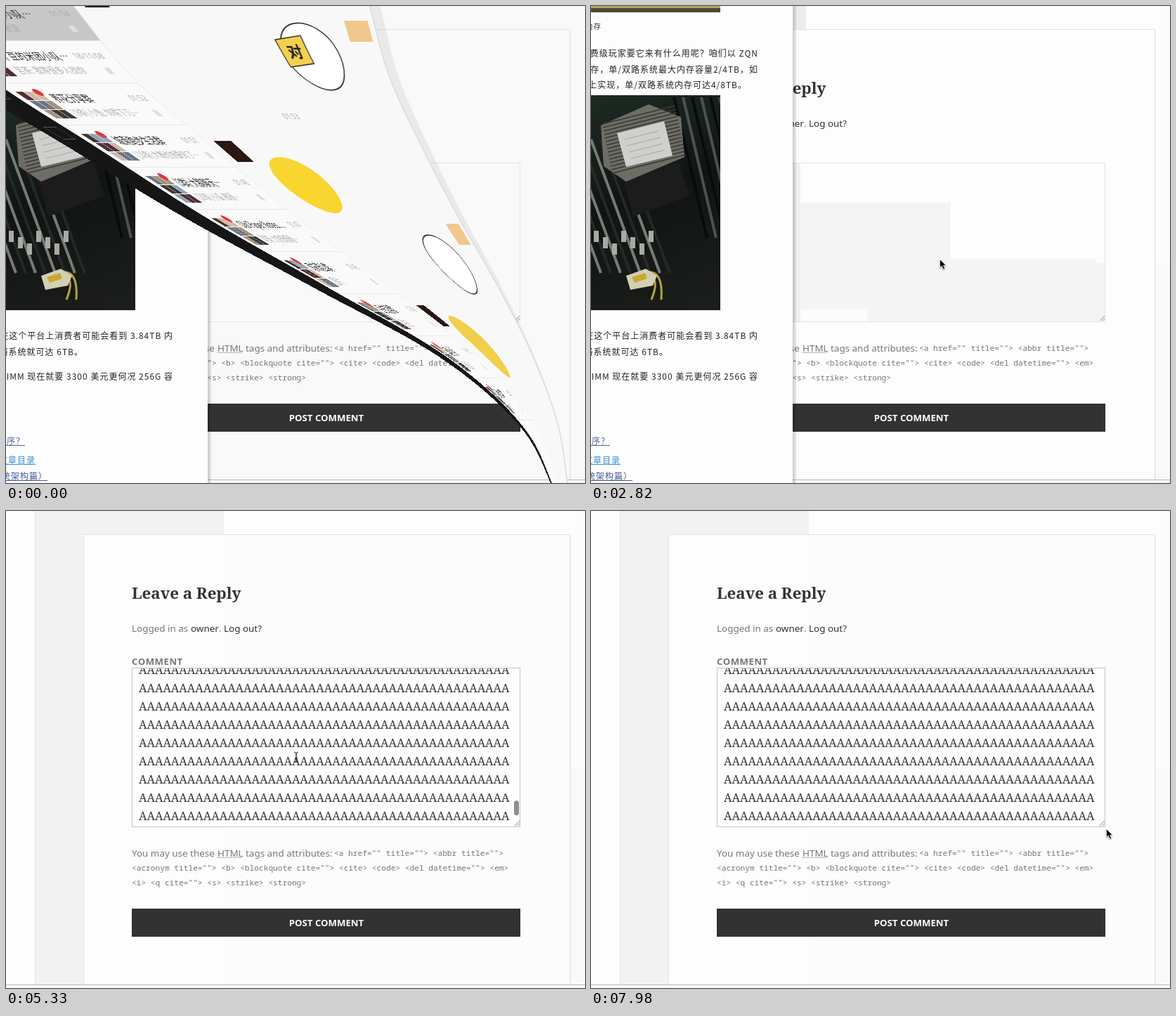
These frames come from a looping animation (824 px wide and 679 px high, 8 s). An HTML page with a canvas:

```html
<!DOCTYPE html>
<html lang="en">
<head>
<meta charset="utf-8">
<style>
html, body { margin: 0; width: 824px; height: 679px; overflow: hidden; background: #fdfdfd; }
canvas { display: block; }
</style>
</head>
<body>
<canvas id="stage" width="824" height="679"></canvas>
<script>
const LOOP = 8000;
const SANS = '"Noto Sans", sans-serif';
const SERIF = '"Noto Serif", serif';
const MONO = '"Noto Sans Mono", monospace';
const CJK = '"Noto Sans CJK SC", "Noto Sans CJK", sans-serif';
const GREY = '#777', DARK = '#333';

const stage = document.getElementById('stage').getContext('2d');
let c = stage;

function rect(x, y, w, h, fill) {
  c.fillStyle = fill;
  c.fillRect(x, y, w, h);
}

function text(str, x, y, font, fill, align = 'left', spacing = 0) {
  c.font = font;
  c.fillStyle = fill;
  c.textAlign = align;
  c.letterSpacing = spacing + 'px';
  c.fillText(str, x, y);
}

function path(points, fill, stroke, width = 1) {
  c.beginPath();
  for (let i = 0; i < points.length; i += 2) c.lineTo(points[i], points[i + 1]);
  if (fill) { c.closePath(); c.fillStyle = fill; c.fill(); }
  if (stroke) { c.strokeStyle = stroke; c.lineWidth = width; c.stroke(); }
}

function ellipse(x, y, rx, ry, angle, fill, stroke) {
  c.beginPath();
  c.ellipse(x, y, rx, ry, angle, 0, 7);
  c.fillStyle = fill;
  c.fill();
  if (stroke) { c.strokeStyle = stroke; c.lineWidth = 1.5; c.stroke(); }
}

function frame(x, y, w, h, stroke) {
  c.strokeStyle = stroke;
  c.lineWidth = 1;
  c.strokeRect(x + .5, y + .5, w - 1, h - 1);
}

// Latest entry whose time has passed
const at = (keys, t) => keys.findLast(k => k[0] <= t);

const pointer = [
  [0, -50, -50], [1180, 274, 280], [1330, 577, 500], [1630, 688, 626],
  [1780, 702, 648], [1930, 711, 664], [2070, 713, 672], [2220, 707, 668],
  [2670, 600, 505], [2820, 496, 360], [3830, 500, 367], [4580, 400, 277],
  [4880, 402, 290], [5030, 406, 312], [5180, 410, 335], [5330, 413, 350],
  [5770, 440, 376], [5910, 560, 405], [6060, 660, 428], [6210, 716, 434],
  [6350, 739, 432], [6500, 746, 475], [6640, 755, 555], [6790, 763, 632],
  [6940, 780, 664], [7240, 739, 641], [7680, 738, 570], [7830, 735, 500],
  [7980, 733, 452]
];
const scrolling = [[0, 0], [5030, 7], [5180, 20], [5330, 33], [5770, 59], [5910, 85]];

function drawBackground(t) {
  if (t < 880) return rect(0, 0, 824, 679, '#f9f9f9');
  rect(0, 0, 824, 679, '#fdfdfd');
  rect(804, 366, 20, 308, '#f9f9f9');
  rect(811, 0, 13, 366, '#fbfbfb');
  if (t < 3390) return rect(288, 0, 18, 33, '#ececec');
  rect(310, 34, 492, 640, '#fcfcfc');
  rect(41, 0, 69, 674, '#f2f2f2');
  rect(110, 0, 200, 33, '#f2f2f2');
  rect(41, 0, 1, 674, '#e4e4e4');
}

function drawField(t) {
  if (t >= 3530) rect(180, 224, 551, 225, '#fefefe');
  else if (t >= 880) {
    const open = t >= 3390;
    const left = open ? 310 : 298;
    rect(left, 280, 512 - left, 169, '#f4f4f4');
    rect(512, t >= 2820 ? 360 : 366, 206, 89, '#f4f4f4');
    rect(718, 366, 13, 83, '#f4f4f4');
    rect(left, 431, 393 - left, 18, '#fcfcfc');
    rect(180, 224, left - 180, 225, open ? '#f3f3f3' : '#efefef');
  }
  if (t >= 3530) drawComment(t);
  frame(179, 223, 553, 227, t >= 3530 ? '#c4c4c4' : '#e4e4e4');
  path([724, 448, 731, 441], null, '#888');
  path([728, 448, 731, 445], null, '#888');
}

function drawComment(t) {
  const scroll = at(scrolling, t)[1];
  c.save();
  c.beginPath();
  c.rect(180, 224, 551, 225);
  c.clip();
  let caret = 189, base = 249;
  if (t >= 4580) {
    const font = `16.27px ${SERIF}`;
    base = 433 + scroll;
    const last = 'A'.repeat(28) + "'></a>";
    text(last, 189, base, font, DARK);
    caret = 189 + c.measureText(last).width;
    for (let row = 1; row < 14; row++) text('A'.repeat(46), 189, base - row * 26, font, DARK);
    if (t < 6940) {
      c.beginPath();
      c.roundRect(723, 415 - scroll * .083, 7, 21, 3.5);
      c.fillStyle = '#8e8e8e';
      c.fill();
    }
  }
  if (t >= 3830) rect(Math.round(caret), base - 15, 1, 20, '#222');
  c.restore();
}

function drawPage(t) {
  drawBackground(t);
  frame(110, 33, 693, 660, '#e2e2e2');
  rect(803, 35, 1, 640, '#f0f0f0');
  rect(0, 675, 824, 4, '#fbfbfb');
  rect(0, 674, 824, 1, '#b8b8b8');

  const body = `13.44px ${SANS}`, code = `11.18px ${MONO}`;
  text('Leave a Reply', 179, 125, `bold 22.3px ${SERIF}`, DARK);
  text('Logged in as', 179, 172, body, GREY);
  text('owner', 263, 172, body, DARK);
  text('.', 303, 172, body, GREY);
  text('Log out?', 310, 172, body, DARK);
  text('COMMENT', 179, 219, `bold 13.2px ${SANS}`, GREY, 'left', .5);
  drawField(t);

  text('You may use these', 179, 492, body, GREY);
  text('HTML', 301, 492, body, GREY);
  c.setLineDash([1, 1]);
  path([301, 493.5, 337, 493.5], null, GREY);
  c.setLineDash([]);
  text('tags and attributes:', 341, 492, body, GREY);
  text('<a href="" title=""> <abbr title="">', 467, 491, code, GREY);
  text('<acronym title=""> <b> <blockquote cite=""> <cite> <code> <del datetime=""> <em>', 179, 512, code, GREY);
  text('<i> <q cite=""> <s> <strike> <strong>', 179, 533, code, GREY);
  rect(179, 566, 553, 40, '#323232');
  text('POST COMMENT', 456, 591, `bold 13.2px ${SANS}`, '#fff', 'center');
}

function drawPhoto() {
  c.save();
  c.beginPath();
  c.rect(0, 127, 184, 306);
  c.clip();
  const board = c.createLinearGradient(0, 127, 120, 433);
  board.addColorStop(0, '#1d2b24');
  board.addColorStop(.5, '#101412');
  board.addColorStop(1, '#1b1d1b');
  rect(0, 127, 184, 306, board);
  for (let i = 0; i < 9; i++) {
    path([-70 + i * 14, 190, i * 14, 380], null, i % 2 ? '#777b76' : '#252a27', 4);
    path([118 + i * 13, 130, 165 + i * 13, 330], null, i % 2 ? '#4d524e' : '#090b0a', 4);
  }
  path([45, 245, 125, 222, 140, 270, 60, 300], '#1b1c1b');
  path([14, 170, 82, 140, 128, 158, 133, 215, 50, 250, 18, 228], '#6d6c65');
  for (let i = 0; i < 15; i++) path([16 + i, 168 + i * 5, 120 + i, 142 + i * 5], null, '#383832', 1.5);
  path([37, 181, 104, 164, 116, 213, 50, 229], '#cfcfcd');
  for (let i = 0; i < 4; i++) path([48 + i * 3, 190 + i * 9, 96 + i * 3, 178 + i * 9], null, '#a5a5a2', 1);
  for (let i = 0; i < 7; i++) rect(4 + i * 13, 320 + i % 3 * 9, 7, 16, '#a9aaa4');
  for (let i = 0; i < 4; i++) {
    c.beginPath();
    c.moveTo(62, 386 + i * 4);
    c.quadraticCurveTo(104, 362 + i * 5, 100 - i * 7, 418);
    c.strokeStyle = i % 2 ? '#171712' : '#b3a43f';
    c.lineWidth = 3;
    c.stroke();
  }
  path([50, 384, 78, 374, 94, 384, 88, 398, 56, 404], '#d2cfb4');
  path([58, 386, 77, 380, 80, 388, 62, 394], '#c9a92d');
  c.restore();
}

function drawArticle() {
  const shade = c.createLinearGradient(287, 0, 293, 0);
  shade.addColorStop(0, 'rgba(0,0,0,.2)');
  shade.addColorStop(1, 'rgba(0,0,0,.05)');
  rect(287, 0, 5, 679, shade);
  rect(0, 0, 287, 679, '#fdfdfd');
  rect(0, 0, 184, 9, '#4b4a38');
  rect(0, 0, 184, 3, '#b5a55c');
  drawPhoto();
  const line = (str, right, y, color = '#222', size = 12) =>
    text(str, right, y + 4.5, `${size}px ${CJK}`, color, 'right', 1);
  const link = (str, right, y, color) => {
    line(str, right, y, color);
    rect(0, y + 6, right, 1, color);
  };
  line('内存', 15, 28, '#333', 10.5);
  line('费级玩家要它来有什么用呢？咱们以 ZQN', 238, 67);
  line('内存，单/双路系统最大内存容量2/4TB，如', 238, 90);
  line('台上实现，单/双路系统内存可达4/8TB。', 222, 112);
  line('在这个平台上消费者可能会看到 3.84TB 内', 238, 469);
  line('络系统就可达 6TB。', 110, 492);
  line('DIMM 现在就要 3300 美元更何况 256G 容', 238, 527);
  link('排序？', 27, 619, '#52659b');
  link('文章目录', 42, 646, '#3b8fd4');
  link('统架构篇）', 59, 669, '#445a96');
}

// The chat window, drawn flat once and warped later
function makeChat() {
  const canvas = document.createElement('canvas');
  canvas.width = 700;
  canvas.height = 780;
  c = canvas.getContext('2d');
  rect(0, 0, 700, 780, '#f8f8f8');
  rect(55, 0, 232, 780, '#fafafa');
  rect(0, 0, 55, 780, '#161616');
  rect(55, 80, 232, 60, '#c8c8c8');
  rect(286, 0, 1, 780, '#e3e3e3');
  frame(16, 205, 24, 18, '#555');
  frame(16, 262, 24, 18, '#555');

  const chats = [
    ['小林的汤圆小队…', '01:54', '今天谁来做饭'],
    ['丫豆的米团小队…', '18/11/08', '苦茶: 我等很多人找你'],
    ['养花分享群', '01:52', '[8条] 小鱼: 你得下几…'],
    ['城南跑步生活群', '01:51', '[10条] 大概也快要到了…'],
    ['(3群) 大鹅聊天…', '01:48', '[20条] 小溪: 都很…'],
    ['Old Paper Notes…', '01:47', '阿青: 大家慢慢看…'],
    ['周末爬山群', '01:45', '[图片]'],
    ['旧书交换群', '01:40', '明天见'],
    ['面包小组', '01:33', '好的好的'],
    ['河边钓鱼群', '01:20', '收到']
  ];
  const tiles = ['#3c3834', '#a98f7a', '#6a7685', '#d0b7a8', '#4f2f33', '#8ea3b8'];
  chats.forEach(([name, time, note], row) => {
    const y = 80 + row * 60;
    rect(55, y + 59, 232, 1, '#e8e8e8');
    for (let i = 0; i < 9; i++)
      rect(66 + i % 3 * 13, y + 12 + Math.floor(i / 3) * 13, 12, 12, tiles[(i * 5 + row * 2 + (i >> 1)) % 6]);
    if (row > 1) ellipse(102, y + 13, 6, 5, 0, '#e8323a');
    text(name, 113, y + 26, `13px ${CJK}`, '#222');
    text(time, 272, y + 25, `11px ${SANS}`, '#aaa', 'right');
    text(note, 113, y + 46, `11.5px ${CJK}`, '#aaa');
    rect(256, y + 38, 8, 9, '#ddd');
  });

  const person = (x, y, color) => rect(x, y, 34, 30, color);
  person(302, 62, '#2a1712');
  person(658, 111, '#f0c88b');
  ellipse(593, 162, 42, 48, -.2, '#fff', '#222');
  path([547, 138, 587, 132, 590, 172, 551, 177], '#f5d04c', '#333', 1.5);
  text('对', 569, 163, `bold 22px ${CJK}`, '#222', 'center');
  text('01:53', 493, 251, `11px ${SANS}`, '#aaa', 'center');
  person(302, 282, '#2a1712');
  ellipse(398, 345, 52, 40, 0, '#f8d52f');
  person(658, 400, '#f0c88b');
  ellipse(590, 458, 48, 42, 0, '#fff', '#222');
  person(302, 516, '#2a1712');
  ellipse(398, 575, 52, 44, 0, '#f2cf4a');
  c = stage;
  return canvas;
}

// Window edges, one x for every 100 px of height
const LEFT = [-195, -75, 88, 253, 437, 618, 733, 785];
const RIGHT = [517, 545, 591, 643, 700, 750, 786, 801];

function spline(p, y) {
  const i = Math.floor(y / 100), f = y / 100 - i;
  const b = p[i], d = p[i + 1];
  const a = p[i - 1] ?? 2 * b - d, e = p[i + 2] ?? 2 * d - b;
  return b + .5 * f * (d - a + f * (2 * a - 5 * b + 4 * d - e + f * (3 * (b - d) + e - a)));
}

function drawGenie(t) {
  const step = Math.floor((t + 4) / 146);
  if (step > 5) return;
  const top = 800 * (step / 6) ** 1.15 - 90;
  for (let y = Math.max(0, Math.ceil(top)); y < 679; y++) {
    const left = spline(LEFT, y), right = spline(RIGHT, y);
    const width = right - left;
    c.drawImage(chat, 0, Math.min(779, Math.floor(y - top)), 700, 1, left, y, width, 1);
    rect(right, y, width * .022, 1, 'rgba(0,0,0,.06)');
    rect(right, y, 1.2, 1, '#d6d6d6');
  }
}

function drawPointer(t) {
  const [, x, y] = at(pointer, t);
  c.save();
  c.translate(x, y);
  if (t >= 3830 && t < 6350) {
    path([-3, -7, 0, -5.5, 3, -7], null, '#222');
    path([0, -5.5, 0, 6], null, '#222', 1.3);
    path([-3, 7.5, 0, 6, 3, 7.5], null, '#222');
    path([-2, 2.5, 2, 2.5], null, '#222');
  } else {
    c.shadowColor = 'rgba(0,0,0,.35)';
    c.shadowBlur = 2;
    c.shadowOffsetY = 1;
    path([.5, .5, .5, 12.5, 3.2, 10, 5.4, 14.8, 7.6, 13.8, 5.5, 9.3, 9.2, 9.3], '#000', '#fff', .8);
  }
  c.restore();
}

const chat = makeChat();

function draw(now) {
  const t = now % LOOP;
  drawPage(t);
  if (t < 3390) drawArticle();
  drawGenie(t);
  drawPointer(t);
  requestAnimationFrame(draw);
}
draw(0);
</script>
</body>
</html>
```
